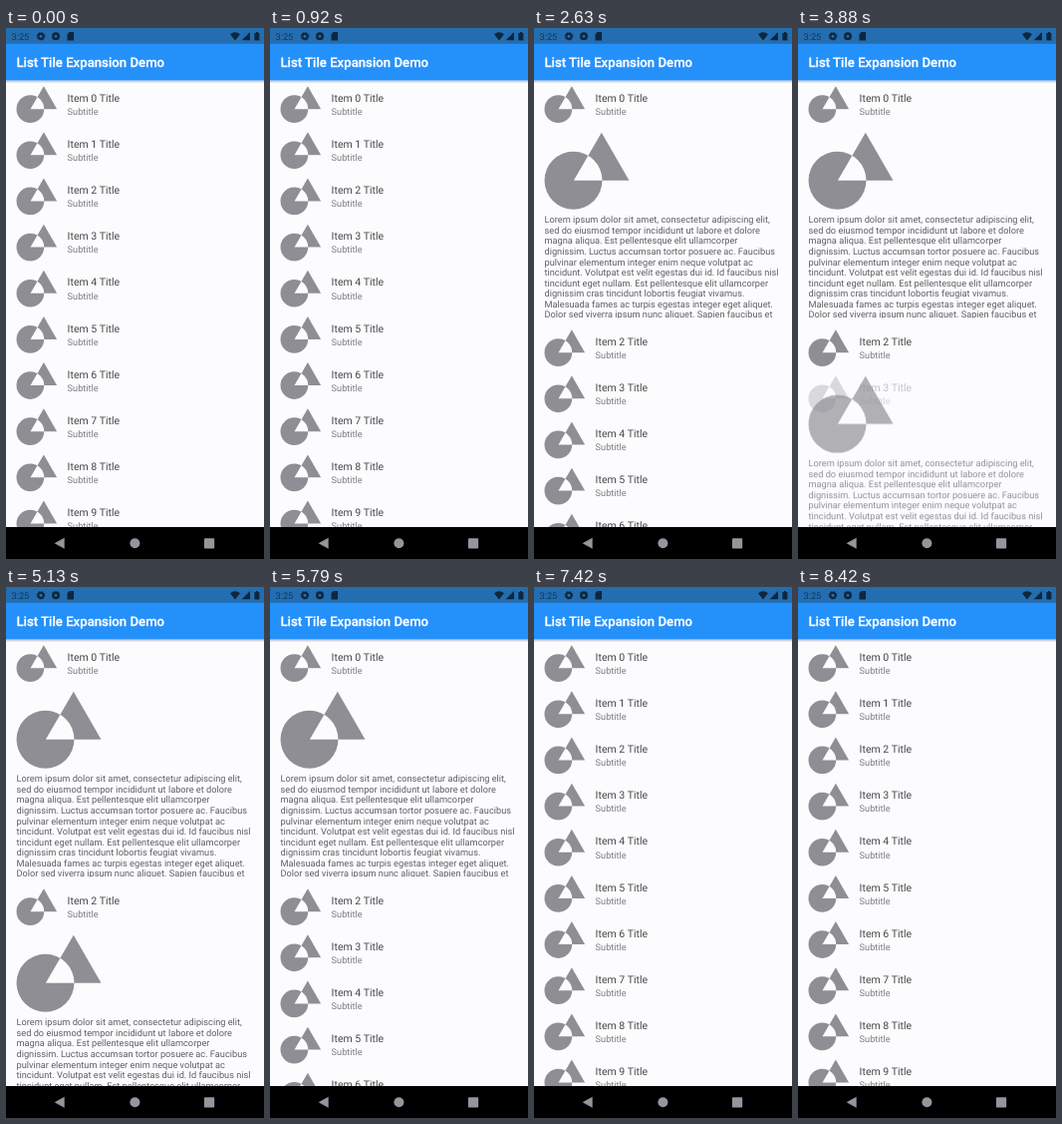
Write an HTML page that moves like this. It is 259x532 px and loops after 8.83 s.

```html
<!DOCTYPE html>
<html lang="en">
<head>
<meta charset="utf-8">
<title>List Tile Expansion Demo</title>
<style>
  html, body { margin: 0; width: 100%; height: 100%; overflow: hidden; background: #fcfcff; }
  svg { display: block; width: 100%; height: 100%; }
  text { font-family: Roboto, Arial, sans-serif; text-rendering: geometricPrecision; white-space: pre; }
  .title { font-size: 10.55px; fill: #484848; }
  .sub { font-size: 9.23px; fill: #7e7e80; }
  .body { font-size: 9.23px; fill: #5f5f62; }
  .shape { fill: #8f8e94; fill-rule: evenodd; }
  .nav { fill: #97949f; }
  .status { fill: #10263c; }
</style>
</head>
<body>
<svg viewBox="0 0 259 532">
  <defs>
    <path id="shape" class="shape" d="M57.3 0L85 48H29.4ZM0 48a29 29 0 1 0 58 0a29 29 0 1 0 -58 0Z"/>
    <clipPath id="bodyClip"><rect width="259" height="186.4"/></clipPath>
    <linearGradient id="shadow" x2="0" y2="1">
      <stop stop-color="#303078" stop-opacity=".3"/>
      <stop offset="1" stop-color="#303078" stop-opacity="0"/>
    </linearGradient>
  </defs>
  <rect width="259" height="532" fill="#fcfcff"/>
  <g id="list"></g>

  <rect y="52.5" width="259" height="3" fill="url(#shadow)"/>
  <rect width="259" height="52.5" fill="#2491fb"/>
  <rect width="259" height="15.8" fill="#236db0"/>
  <text x="10.4" y="39.3" font-size="13.19" font-weight="500" fill="#fff" stroke="#fff" stroke-width=".25">List Tile Expansion Demo</text>

  <g class="status">
    <text x="5.5" y="11.5" font-size="9.2" opacity=".75">3:25</text>
    <circle cx="35" cy="8.3" r="2.6" fill="none" stroke="#10263c" stroke-width="2"/>
    <circle cx="35" cy="8.3" r="3.8" fill="none" stroke="#10263c" stroke-dasharray="1.5 1.484"/>
    <circle cx="50" cy="8.3" r="4"/>
    <circle cx="50" cy="8.3" r="1.4" fill="#236db0"/>
    <path d="M61.5 6.5L63.5 4H68V12.5H61.5Z"/>
    <path d="M225 6.2Q230 2.4 235 6.2L230 12.4Z"/>
    <path d="M245 4V12.3H236.7Z"/>
    <path d="M249.4 5H251V4H253V5H254.4V12.4H249.4Z"/>
  </g>

  <rect y="500" width="259" height="32"/>
  <g class="nav">
    <path d="M48.6 516.2L58.7 510.7V521.7Z"/>
    <circle cx="129.4" cy="516.3" r="5"/>
    <rect x="199" y="511.3" width="10.2" height="10.2" rx=".8"/>
  </g>
</svg>
<script>
const LOOP = 8830, FADE = 500, PITCH = 46.15, GROWTH = 151.7, TOP = 58;
const taps = { 1: [1748, 6860], 3: [3535, 5160] }; // open and close times per row
const lines = [
  'Lorem ipsum dolor sit amet, consectetur adipiscing elit,',
  'sed do eiusmod tempor incididunt ut labore et dolore',
  'magna aliqua. Est pellentesque elit ullamcorper',
  'dignissim. Luctus accumsan tortor posuere ac. Faucibus',
  'pulvinar elementum integer enim neque volutpat ac',
  'tincidunt. Volutpat est velit egestas dui id. Id faucibus nisl',
  'tincidunt eget nullam. Est pellentesque elit ullamcorper',
  'dignissim cras tincidunt lobortis feugiat vivamus.',
  'Malesuada fames ac turpis egestas integer eget aliquet.',
  'Dolor sed viverra ipsum nunc aliquet. Sapien faucibus et'
];

const tile = i => `<g class="tile">
  <use href="#shape" transform="translate(10.5 .2) scale(.478)"/>
  <text class="title" x="61.6" y="15.8">Item ${i} Title</text>
  <text class="sub" x="61.6" y="29">Subtitle</text></g>`;

const details = `<g class="details" clip-path="url(#bodyClip)">
  <use href="#shape" x="10.5" y=".6"/>
  ${lines.map((s, n) => `<text class="body" x="10.5" y="${91.2 + n * 10.55}">${s}</text>`).join('')}</g>`;

const list = document.getElementById('list');
list.innerHTML = Array.from({ length: 10 }, (_, i) =>
  `<g>${tile(i)}${taps[i] ? details : ''}</g>`).join('');
const rows = [...list.children];

const clamp = v => Math.min(1, Math.max(0, v));

function draw(now) {
  const t = now % LOOP;
  let y = TOP;
  rows.forEach((row, i) => {
    row.setAttribute('transform', `translate(0 ${y})`);
    y += PITCH;
    if (!taps[i]) return;
    const [open, close] = taps[i];
    const p = clamp((t - open) / FADE) - clamp((t - close) / FADE);
    row.querySelector('.tile').setAttribute('opacity', 1 - p);
    row.querySelector('.details').setAttribute('opacity', p);
    y += GROWTH * p;
  });
}

const start = performance.now();
function frame() {
  draw(performance.now() - start);
  requestAnimationFrame(frame);
}
frame();
</script>
</body>
</html>
```
